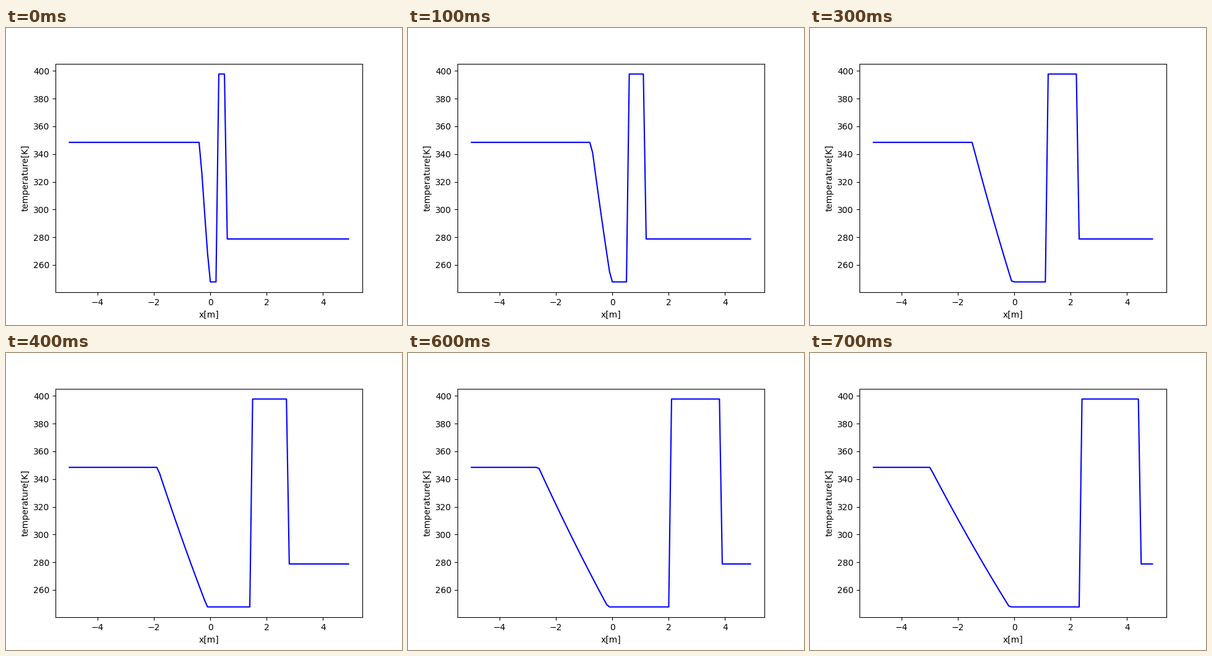
Recreate the animation shown at these times as a matplotlib script. Size 640 px wide and 480 px high, loop 800 ms.

```python
"""Temperature in a shock tube: exact Riemann solution over time."""
import numpy as np
import matplotlib.pyplot as plt
from matplotlib.animation import FuncAnimation

GAMMA, R_GAS = 1.4, 287.0
P_L, RHO_L = 1e5, 1.0
P_R, RHO_R = 1e4, 0.125
FRAMES, INTERVAL, TIME_STEP = 8, 100, 1e-3

A_L = np.sqrt(GAMMA * P_L / RHO_L)
T_L, T_R = P_L / (RHO_L * R_GAS), P_R / (RHO_R * R_GAS)
BETA = (GAMMA - 1) / (GAMMA + 1)


def fan_velocity(p):
    """Gas velocity behind the left rarefaction for star pressure p."""
    return 2 * A_L / (GAMMA - 1) * (1 - (p / P_L) ** ((GAMMA - 1) / (2 * GAMMA)))


def shock_velocity(p):
    """Gas velocity behind the right shock for star pressure p."""
    return (p - P_R) * np.sqrt(2 / ((GAMMA + 1) * RHO_R * (p + BETA * P_R)))


def star_pressure():
    low, high = P_R, P_L
    for _ in range(60):
        mid = (low + high) / 2
        if fan_velocity(mid) > shock_velocity(mid):
            low = mid
        else:
            high = mid
    return mid


P_STAR = star_pressure()
U_STAR = fan_velocity(P_STAR)
A_STAR = A_L - (GAMMA - 1) / 2 * U_STAR
T_COLD = A_STAR**2 / (GAMMA * R_GAS)
RATIO = P_STAR / P_R
T_HOT = T_R * RATIO * (1 + BETA * RATIO) / (RATIO + BETA)
SHOCK_SPEED = (P_STAR - P_R) / (RHO_R * U_STAR)


def temperature(x, t):
    speed = x / t
    a_fan = A_L - (GAMMA - 1) / (GAMMA + 1) * (A_L + speed)
    regions = [speed < -A_L, speed < U_STAR - A_STAR,
               speed < U_STAR, speed < SHOCK_SPEED]
    values = [T_L, a_fan**2 / (GAMMA * R_GAS), T_COLD, T_HOT]
    return np.select(regions, values, T_R)


x = np.arange(-50, 50) / 10
fig, ax = plt.subplots(figsize=(6.4, 4.8), dpi=100)
line, = ax.plot(x, temperature(x, TIME_STEP), color="blue")
ax.set_xlabel("x[m]")
ax.set_ylabel("temperature[K]")


def update(frame):
    line.set_ydata(temperature(x, (frame + 1) * TIME_STEP))
    return line,


anim = FuncAnimation(fig, update, frames=FRAMES, interval=INTERVAL,
                     repeat=True, repeat_delay=0)
plt.show()
```
